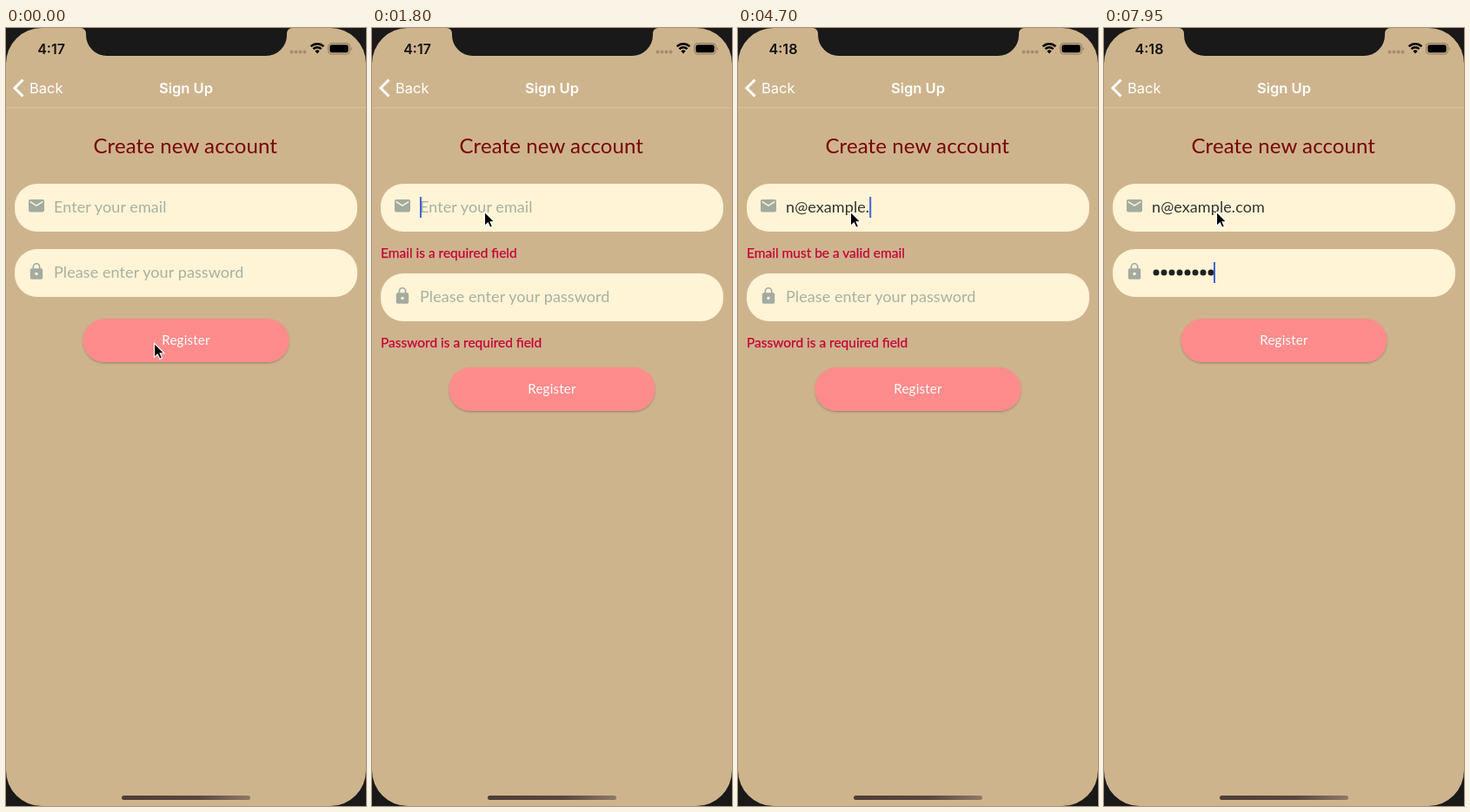
Write an HTML page that moves like this. It is 414 px wide and 894 px high and loops after 8 s.

```html
<!DOCTYPE html>
<html lang="en">
<head>
<meta charset="utf-8">
<title>Sign Up</title>
<style>
  html, body { margin: 0; width: 414px; height: 894px; overflow: hidden; background: #191919; }
  svg { display: block; font-family: Lato, "Open Sans", sans-serif; }
  .ui { font-family: Inter, "Liberation Sans", sans-serif; }
  .box { fill: #fff4d6; }
  .icon { fill: #a2aba0; }
  .hint { fill: #a9b0a3; }
  .hint, .typed { font-size: 18px; letter-spacing: .09px; }
  .typed { fill: #333; }
  .error { fill: #c60039; stroke: #c60039; stroke-width: .25px; font-size: 15.5px; }
</style>
</head>
<body>
<svg width="414" height="894" viewBox="0 0 414 894">
  <defs>
    <linearGradient id="bar">
      <stop offset="0" stop-color="#4d3f37"/>
      <stop offset=".6" stop-color="#574840"/>
      <stop offset="1" stop-color="#8e7b65"/>
    </linearGradient>
    <filter id="shadow" x="-5%" y="-10%" width="110%" height="130%">
      <feDropShadow dx="0" dy="1.2" stdDeviation="1" flood-color="#000" flood-opacity=".28"/>
    </filter>
  </defs>

  <rect width="414" height="894" rx="41" fill="#ceb48d"/>
  <path d="M86 0A6 6 0 0 1 92 6V8A24 24 0 0 0 116 32H299A24 24 0 0 0 323 8V6A6 6 0 0 1 329 0Z" fill="#191919"/>
  <path d="M0 91.5H414" stroke="#d9c3a0"/>

  <!-- status bar -->
  <g class="ui">
    <text id="clock" x="52" y="29.5" text-anchor="middle" font-size="16" font-weight="600" fill="#111"></text>
    <path d="M328.5 27.5H344" stroke="#a18d6e" stroke-width="4" stroke-linecap="round" stroke-dasharray="0 5"/>
    <path d="M350.6 21.2A10.5 10.5 0 0 1 365.4 21.2M353.4 24.2A6.6 6.6 0 0 1 362.6 24.2" fill="none" stroke="#000" stroke-width="2.5"/>
    <path d="M355.4 26.6A3.7 3.7 0 0 1 360.6 26.6L358 29.4Z"/>
    <rect x="370.5" y="17.5" width="25" height="12.5" rx="3.8" fill="none" stroke="#8a785c"/>
    <rect x="372.3" y="19.3" width="21.4" height="8.9" rx="2.3"/>
    <path d="M397 21.8Q399 23.8 397 25.8Z" fill="#8a785c"/>

    <g fill="#fff" font-size="16.5">
      <path d="M19.5 59.5L10 69L19.5 78.5" fill="none" stroke="#fff" stroke-width="3"/>
      <text x="27" y="75">Back</text>
      <text x="207" y="75" text-anchor="middle" font-weight="600">Sign Up</text>
    </g>
  </g>

  <text x="206.3" y="143.7" text-anchor="middle" font-size="24" letter-spacing=".1" fill="#780508">Create new account</text>

  <g transform="translate(0 179)">
    <rect class="box" x="10" width="394" height="55" rx="26"/>
    <path class="icon" transform="translate(24.2 14.4) scale(.9)" d="M20 4H4c-1.1 0-2 .9-2 2v12c0 1.1.9 2 2 2h16c1.1 0 2-.9 2-2V6c0-1.1-.9-2-2-2zm0 4l-8 5-8-5V6l8 5 8-5z"/>
    <text id="emailHint" class="hint" x="55" y="33">Enter your email</text>
    <text id="email" class="typed" x="55" y="33"></text>
    <text id="emailError" class="error" x="10" y="85.2"></text>
  </g>

  <g id="password">
    <rect class="box" x="10" width="394" height="55" rx="26"/>
    <path class="icon" transform="translate(24.2 15) scale(.9)" fill-rule="evenodd" d="M18 8h-1V6A5 5 0 0 0 7 6v2H6a2 2 0 0 0-2 2v10a2 2 0 0 0 2 2h12a2 2 0 0 0 2-2V10a2 2 0 0 0-2-2zM12 17a2 2 0 1 1 0-4a2 2 0 0 1 0 4zM15.1 8H8.9V6a3.1 3.1 0 0 1 6.2 0z"/>
    <text id="passwordHint" class="hint" x="55" y="33">Please enter your password</text>
    <path id="dots" stroke="#222" stroke-width="7" stroke-linecap="round" stroke-dasharray="0 9"/>
    <text id="passwordError" class="error" x="10" y="85.2"></text>
  </g>

  <g id="button">
    <rect x="88.5" width="237" height="50" rx="25" fill="#ff8c8c" filter="url(#shadow)"/>
    <text x="207" y="30" text-anchor="middle" font-size="15" letter-spacing=".25" fill="#fff">Register</text>
  </g>

  <rect id="caret" width="2" height="24" fill="#4064d8"/>
  <rect x="133" y="882" width="148" height="5" rx="2.5" fill="url(#bar)"/>
  <path id="pointer" d="M0 0V16L3.8 12.5L6.3 18L9 16.8L6.6 11.5H11.5Z" stroke="#fff" stroke-width="1.1"/>
</svg>
<script>
  const LOOP = 8000, ADDRESS = "n@example.com";
  const EMAIL_KEYS = [2350, 2750, 2950, 3250, 3650, 3750, 3850, 3950, 4400, 4650, 4800, 4950, 5050];
  const PASSWORD_KEYS = [5800, 6150, 6450, 6700, 7050, 7350, 7700, 7850];
  const SUBMIT = 200, FOCUS_EMAIL = 900, FOCUS_PASSWORD = 5350;
  const EVENTS = [FOCUS_EMAIL, ...EMAIL_KEYS, FOCUS_PASSWORD, ...PASSWORD_KEYS];

  const $ = id => document.getElementById(id);
  const clamp = x => Math.max(0, Math.min(1, x));
  const progress = (t, from, to) => clamp((t - from) / (to - from));
  const mix = (a, b, k) => a + (b - a) * k;
  const ease = k => k * k * (3 - 2 * k);
  const count = (times, t) => times.filter(x => x <= t).length;
  const move = (id, x, y) => $(id).setAttribute("transform", `translate(${x} ${y})`);
  const show = (id, opacity) => $(id).setAttribute("opacity", +opacity);
  const write = (id, text) => { if ($(id).textContent !== text) $(id).textContent = text; };

  // Stays on for about 500 ms after the last event, then blinks every 900 ms
  function caretOpacity(t) {
    if (t < FOCUS_EMAIL) return 0;
    const phase = (t - EVENTS[count(EVENTS, t) - 1]) % 900;
    return 1 - progress(phase, 480, 560);
  }

  function emailError(t, typed) {
    if (t < SUBMIT || typed >= 12) return "";
    return typed ? "Email must be a valid email" : "Email is a required field";
  }

  function passwordError(t, typed) {
    if (t < SUBMIT || typed >= 4) return "";
    return "Password " + (typed ? "must be at least 4 characters" : "is a required field");
  }

  function draw(t) {
    const letters = count(EMAIL_KEYS, t), dots = count(PASSWORD_KEYS, t);
    const error1 = emailError(t, letters), error2 = passwordError(t, dots);
    const passwordY = error1 ? 282 : 254;

    write("clock", t < 4650 ? "4:17" : "4:18");
    write("email", ADDRESS.slice(0, letters));
    write("emailError", error1);
    write("passwordError", error2);
    show("emailHint", !letters);
    show("passwordHint", !dots);
    show("dots", dots > 0);
    $("dots").setAttribute("d", `M60 27h${Math.max(0, dots - 1) * 9 + .1}`);

    move("password", 0, passwordY);
    move("button", 0, passwordY + (error2 ? 108 : 80));
    show("button", 1 - .6 * (progress(t, 50, 150) - progress(t, 200, 400)));

    const inPassword = t >= FOCUS_PASSWORD;
    const textWidth = inPassword ? dots * 9 : letters && $("email").getComputedTextLength();
    move("caret", 55 + textWidth - (inPassword && dots ? 1 : 0), inPassword ? passwordY + 15 : 194);
    show("caret", caretOpacity(t));

    const k = ease(progress(t, 400, 850));
    move("pointer", mix(170.5, 129.5, k), mix(362.3, 211.3, k));
  }

  const start = performance.now();
  function tick() {
    draw((performance.now() - start) % LOOP);
    requestAnimationFrame(tick);
  }
  tick();
</script>
</body>
</html>
```
